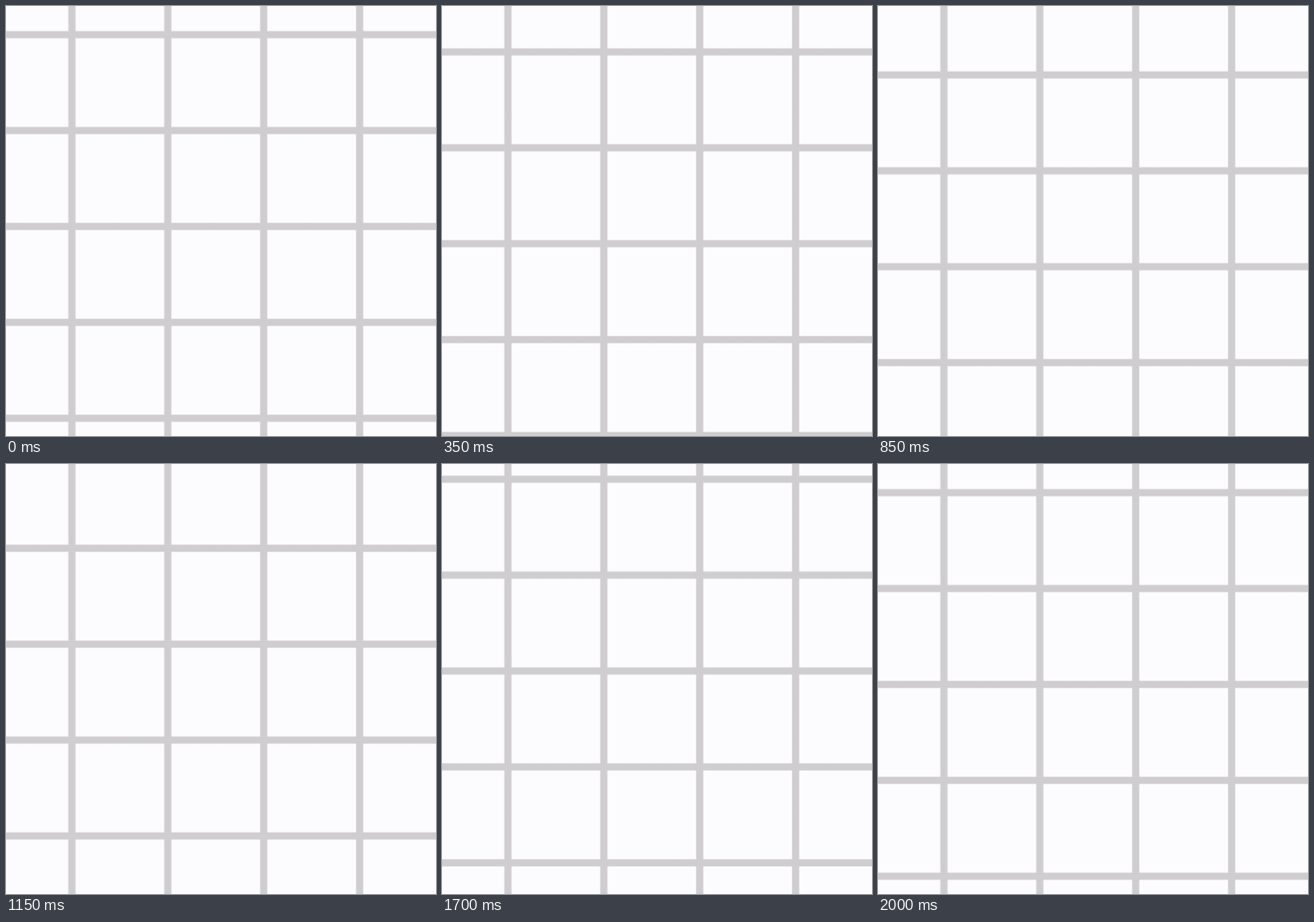
Animation of 600 by 600 pixels, one loop 2050 ms. Source, as an HTML page with a canvas:

```html
<!DOCTYPE html>
<html lang="en">
<head>
<meta charset="utf-8">
<title>Scrolling grid</title>
<style>
html, body { margin: 0; width: 100%; height: 100%; overflow: hidden; background: #fcfbfe; }
canvas { display: block; width: 600px; height: 600px; }
</style>
</head>
<body>
<canvas id="stage" width="600" height="600"></canvas>
<script>
const SIZE = 600;
const LOOP = 2050;
const STEP = 50;
const CELL = 133.8;
const UNIT = CELL / 50;      // scrolling snaps to this length
const UNITS_PER_STEP = 1.25; // one whole cell in 40 steps
const PAPER = '#fcfbfe';
const INK = '#cfcdd0';
const HALF = 5;
const SOFT = 1;

const ctx = document.getElementById('stage').getContext('2d');

// A band around a centre line, with slightly soft edges.
function band(center, vertical) {
  const reach = HALF + SOFT;
  const a = center - reach, b = center + reach;
  const fill = vertical
    ? ctx.createLinearGradient(a, 0, b, 0)
    : ctx.createLinearGradient(0, a, 0, b);
  const edge = SOFT / reach;
  fill.addColorStop(0, 'rgba(207,205,208,0)');
  fill.addColorStop(edge, INK);
  fill.addColorStop(1 - edge, INK);
  fill.addColorStop(1, 'rgba(207,205,208,0)');
  ctx.fillStyle = fill;
  if (vertical) ctx.fillRect(a, 0, b - a, SIZE);
  else ctx.fillRect(0, a, SIZE, b - a);
}

function draw(time) {
  const step = Math.floor((time % LOOP) / STEP);
  const shift = Math.round(step * UNITS_PER_STEP) * UNIT;
  ctx.fillStyle = PAPER;
  ctx.fillRect(0, 0, SIZE, SIZE);
  for (let x = 92; x < SIZE + CELL; x += CELL) band(x, true);
  for (let y = 40 + shift - 2 * CELL; y < SIZE + CELL; y += CELL) band(y, false);
}

const start = performance.now();
function tick() {
  draw(performance.now() - start);
  requestAnimationFrame(tick);
}
tick();
</script>
</body>
</html>
```
